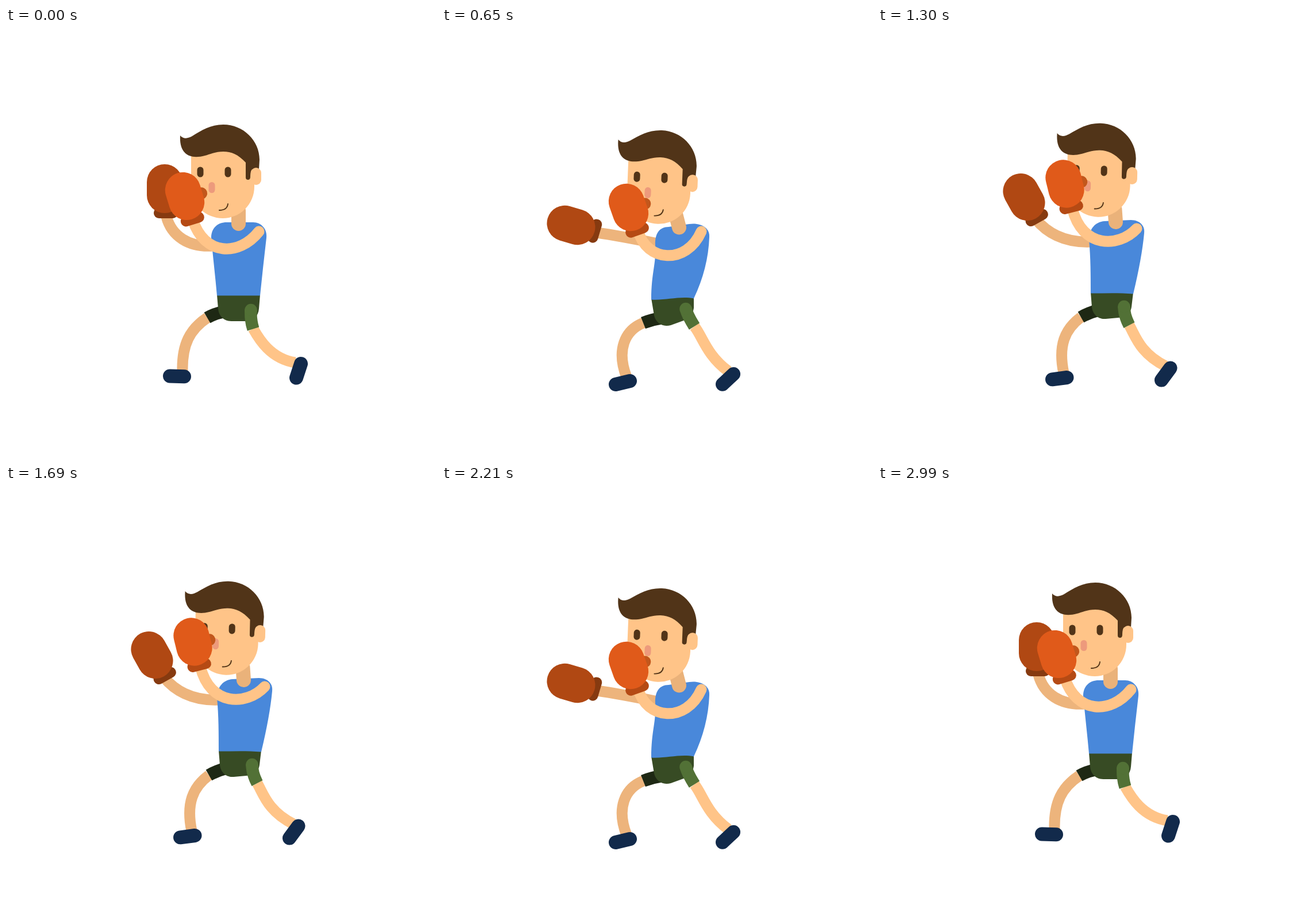
These frames come from a looping animation (748 by 748 pixels, 3.12 s). An HTML page:

```html
<!DOCTYPE html>
<html lang="en">
<head>
<meta charset="utf-8">
<title>Boxer</title>
<style>
  html, body { margin: 0; width: 100%; height: 100%; overflow: hidden; background: #fff; }
  svg { display: block; width: 100vw; height: 100vh; }
  .limb { fill: none; stroke-width: 19; }
  .cuffed { fill: none; stroke-width: 21.5; }
  .shoe { fill: none; stroke: #122a4b; stroke-width: 24; stroke-linecap: round; }
  .round { stroke-linecap: round; }
  .near { stroke: #ffc488; }
  .far { stroke: #edb47c; }
</style>
</head>
<body>
<svg viewBox="0 0 748 748">
  <path id="farArm" class="limb far"/>
  <path id="farLeg" class="limb far"/>
  <path id="farShort" class="cuffed" stroke="#1e2814"/>
  <path id="farShoe" class="shoe"/>
  <path id="shorts" fill="#374b24"/>
  <path id="shirt" fill="#4988da"/>
  <path id="nearLeg" class="limb near"/>
  <path id="nearShort" class="cuffed" stroke="#527136"/>
  <circle id="hip" r="10.75" fill="#527136"/>
  <path id="nearShoe" class="shoe"/>
  <path id="neck" class="round" fill="none" stroke="#eab27a" stroke-width="25"/>
  <g id="head">
    <g transform="translate(-435 -258)">
      <path fill="#ffc488" d="M322 215H432V276A55 55 0 0 1 322 276Z"/>
      <path fill="#513418" d="M303 187C309 194 317 192 324 188C340 178 356 168 378 168C413 168 441 196 441 229L440 246H428Q425 249 425 259Q425 264 421 264Q417 264 417 260V234C404 220 392 215 378 215C364 215 354 220 346 222C320 229 301 220 303 187Z"/>
      <rect x="426" y="243" width="18" height="30" rx="9" fill="#ffc488"/>
      <g fill="#513418">
        <rect x="332.5" y="241.5" width="11" height="18" rx="5.5"/>
        <rect x="380.5" y="241.5" width="11" height="18" rx="5.5"/>
      </g>
      <rect x="352.5" y="268" width="11" height="19" rx="5.5" fill="#ed9a7c"/>
      <path class="round" fill="none" stroke="#513418" stroke-width="1.9" d="M371 317C378 317 385 315 386 306"/>
    </g>
  </g>
  <g id="farGlove">
    <rect x="-19" y="33" width="42" height="18.5" rx="9" fill="#863a10"/>
    <rect x="-31" y="-42.5" width="62" height="85" rx="31" fill="#b04813"/>
  </g>
  <path id="nearArm" class="limb near round"/>
  <g id="nearGlove">
    <circle cx="29" cy="3.7" r="10.3" fill="#c2571c"/>
    <rect x="-20" y="33" width="42" height="18.5" rx="9" fill="#b54a14"/>
    <rect x="-31" y="-42" width="62" height="84" rx="31" fill="#e05a1a"/>
  </g>
</svg>
<script>
const STEP_MS = 130;
const STEPS = 5;
const KEY_STEPS = [0, 1, 3, 5];   // guard, lift, wind-up, punch

const paths = {
  farArm: [
    "M279 328C288 362 318 382 360 379",
    "M275 333C292 354 322 374 370 372",
    "M282 332C292 360 325 378 375 373",
    "M270 356C305 361 330 366 375 375"],
  farLeg: [
    "M350 504C320 524 306 550 307 597",
    "M353 503C325 524 313 552 323 600",
    "M355 499C328 520 316 548 327 597",
    "M350 513C318 526 303 560 321 607"],
  farShort: [
    "M377 494Q362 497 350 504",
    "M383 491Q367 495 353 503",
    "M384 488Q368 491 355 499",
    "M380 505Q365 507 350 513"],
  farShoe: [
    "M285 605.5L310 606.3",
    "M303 611.3L328.5 608",
    "M307 608.3L332 605",
    "M302 620L327 614"],
  nearLeg: [
    "M430 523C440 541 460 575 503 582",
    "M437 517C448 536 456 566 500 588",
    "M439 509C450 529 457 560 499 585",
    "M439 519C453 536 460 569 498 597"],
  nearShort: [
    "M426 490Q425 508 430 523.5",
    "M428 484Q428 500 437 517",
    "M429 477Q429 491 439 509",
    "M424 488Q427 500 439 519"],
  nearShoe: [
    "M513 584L505 608.5",
    "M508.5 591.5L493 612.5",
    "M507 589.3L490 608.7",
    "M507 602L488 619.7"],
  shorts: [
    "M367 464L442 464L440 488C439 502 430 510 416 510L392 510C378 510 370 500 369 488Z",
    "M370 460L444 460L441 485C439 499 430 503 418 504L396 506C382 507 373 497 372 485Z",
    "M371 454L446 455L443 478C441 492 432 497 420 497L398 500C384 501 375 491 374 479Z",
    "M364 470L438 468L438 487C436 499 432 505 420 509L398 517C384 521 372 513 369 500Z"],
  shirt: [
    "M357 365C357 348 368 338 384 338L430 338C444 338 455 350 453 365Q447 416 442 465.5C417 465.5 392 465.5 367 465.5C364 432 360 398 357 365Z",
    "M367 368C367 350 378 337 394 336L440 334C456 334 465 345 463 357Q459 400 444 462.5C420 460.5 395 461.5 370 461.5C370 431 370 400 367 368Z",
    "M370 362C370 344 381 331 397 330L444 328C460 328 469 339 467 353Q463 392 446 457C421 454.5 396 455.5 371 455.5C370 424 374 395 370 362Z",
    "M371 378C370 358 378 346 394 346L430 341C450 338 467 348 465 364Q463 418 438 470.5C414 466 390 474 364 472.5C364 425 373 410 371 378Z"],
  neck: [
    "M404.5 318L404.5 340.5",
    "M412 316L413.5 337.5",
    "M415 310L417 332.5",
    "M405 318L412.5 347"],
  nearArm: [
    "M325 334C345 396 405 398 440 354",
    "M338 314C355 383 418 383 450 349",
    "M342 300C360 374 424 372 454 343",
    "M341 352C355 407 425 413 451 354"]
};

const transforms = {
  head: [
    "translate(435 258) rotate(0)",
    "translate(442 257) rotate(1.3)",
    "translate(446 252) rotate(1.6)",
    "translate(435.7 270.2) rotate(2.3)"],
  farGlove: [
    "translate(276 279.5) rotate(0)",
    "translate(254 294) rotate(-29)",
    "translate(266 286.5) rotate(-18)",
    "translate(224.5 343) rotate(-73.5)"],
  nearGlove: [
    "translate(311 292.5) rotate(-17)",
    "translate(325 271) rotate(-14)",
    "translate(330.5 257.5) rotate(-13.5)",
    "translate(324.5 312) rotate(-19.5)"],
  hip: [
    "translate(426 490.5)",
    "translate(428 484.5)",
    "translate(429 477)",
    "translate(424 488.5)"]
};

const NUMBER = /-?\d+(\.\d+)?/g;

// Blends the numbers of two strings that share one structure.
function blend(from, to, amount) {
  const ends = to.match(NUMBER);
  let i = 0;
  return from.replace(NUMBER, n => +n + (ends[i++] - n) * amount);
}

function applyPose(parts, attribute, step) {
  let k = 0;
  while (k < KEY_STEPS.length - 2 && step >= KEY_STEPS[k + 1]) k++;
  const amount = (step - KEY_STEPS[k]) / (KEY_STEPS[k + 1] - KEY_STEPS[k]);
  for (const [id, keys] of Object.entries(parts)) {
    document.getElementById(id).setAttribute(attribute, blend(keys[k], keys[k + 1], amount));
  }
}

function render(ms) {
  const count = 2 * (STEPS + 1);
  const tick = Math.floor(ms / STEP_MS) % count;
  const step = Math.min(tick, count - 1 - tick);
  applyPose(paths, "d", step);
  applyPose(transforms, "transform", step);
}

const start = performance.now();
function loop() {
  render(performance.now() - start);
  requestAnimationFrame(loop);
}
loop();
</script>
</body>
</html>
```
